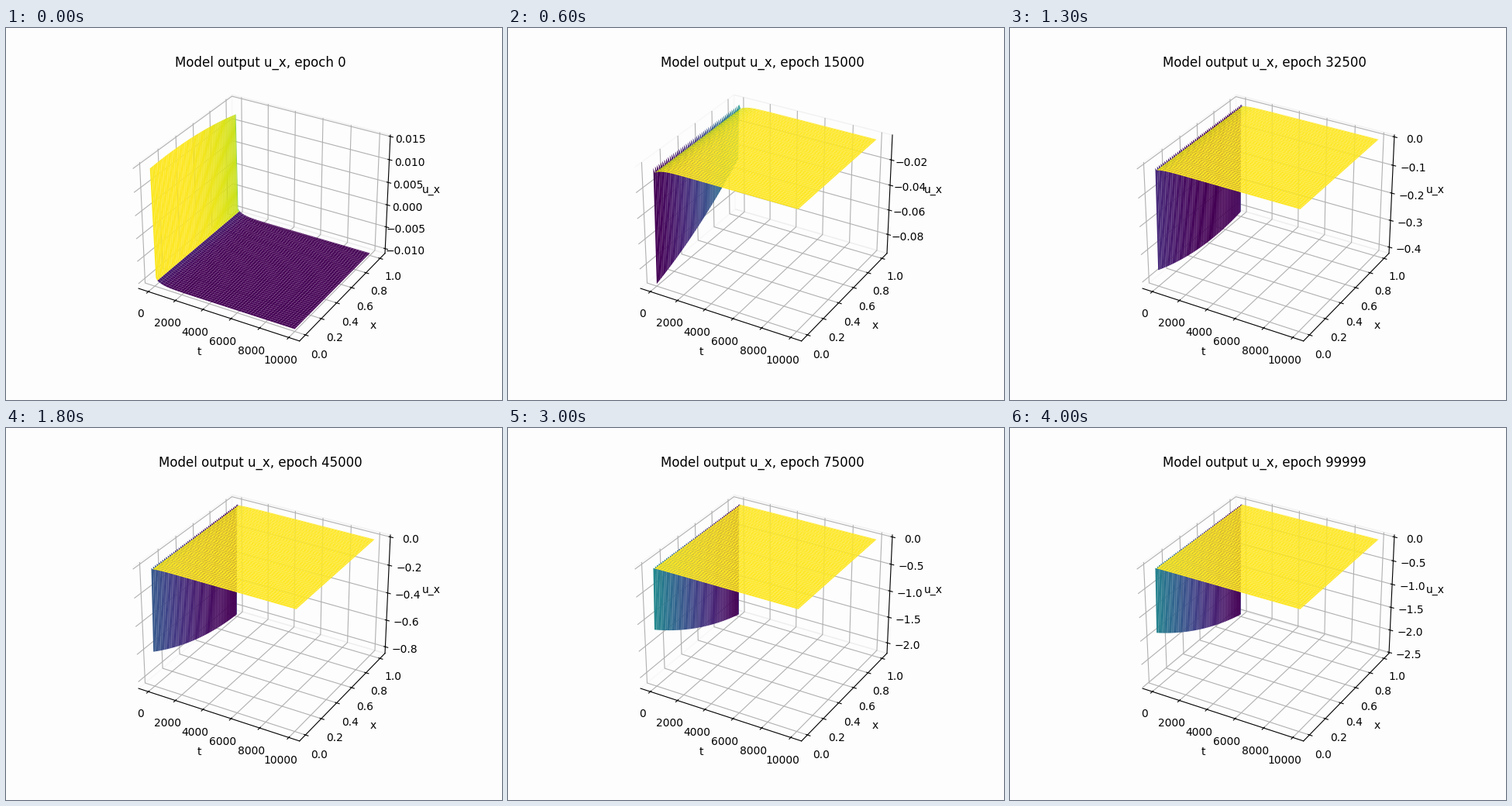
Write a matplotlib script that moves like this. It is 640 px wide and 480 px high and loops after 4100 ms.

```python
import numpy as np
import matplotlib.pyplot as plt
from matplotlib.animation import FuncAnimation

FRAMES = 41
EPOCH_STEP = 2500
LAST_EPOCH = 99999
BACKGROUND = "#fdfdfd"

# Key points of the training: frame, value at t=0 for x=0 and for x=1.
KEYS = np.array([
    (0, 0.0146, 0.0125),
    (6, -0.0938, -0.047),
    (13, -0.364, -0.404),
    (18, -0.596, -0.832),
    (25, -0.912, -1.596),
    (30, -1.135, -2.159),
    (40, -1.364, -2.470),
])
SLOPES = np.gradient(KEYS[:, 1:], KEYS[:, 0], axis=0)

t = np.linspace(0, 10000, 100)
x = np.linspace(0, 1, 100)
T, X = np.meshgrid(t, x)


def wall_ends(frame):
    """Cubic Hermite interpolation through the key points."""
    k, v = KEYS[:, 0], KEYS[:, 1:]
    i = min(np.searchsorted(k, frame, side="right") - 1, len(k) - 2)
    h = k[i + 1] - k[i]
    s = (frame - k[i]) / h
    ease = s * s * (3 - 2 * s)
    return (v[i] + (v[i + 1] - v[i]) * ease
            + h * s * (1 - s) * ((1 - s) * SLOPES[i] - s * SLOPES[i + 1]))


def model_output(frame):
    near, far = wall_ends(frame)
    plateau = 0.004 * far - 0.0106 * np.exp(-frame / 4)
    transient = 0.1 * near * np.exp(-frame / 10)
    bend = 0.07 * (near + far) / 2

    u = plateau + transient * np.exp(-T / 450)
    u[:, 1] = plateau + max(transient, 0)
    u[:, 0] = near + (far - near) * x + 4 * bend * x * (1 - x)
    return u


fig = plt.figure(figsize=(6.4, 4.8), dpi=100, facecolor=BACKGROUND)
ax = fig.add_subplot(projection="3d")


def update(frame):
    ax.clear()
    ax.set_facecolor(BACKGROUND)
    for axis in (ax.xaxis, ax.yaxis, ax.zaxis):
        axis.pane.set_fill(False)
    ax.plot_surface(T, X, model_output(frame), cmap="viridis")
    epoch = min(frame * EPOCH_STEP, LAST_EPOCH)
    ax.set_title(f"Model output u_x, epoch {epoch}")
    ax.set_xlabel("t")
    ax.set_ylabel("x")
    ax.set_zlabel("u_x")
    return []


anim = FuncAnimation(fig, update, frames=FRAMES, interval=100,
                     repeat=True, repeat_delay=0, blit=False)
plt.show()
```
